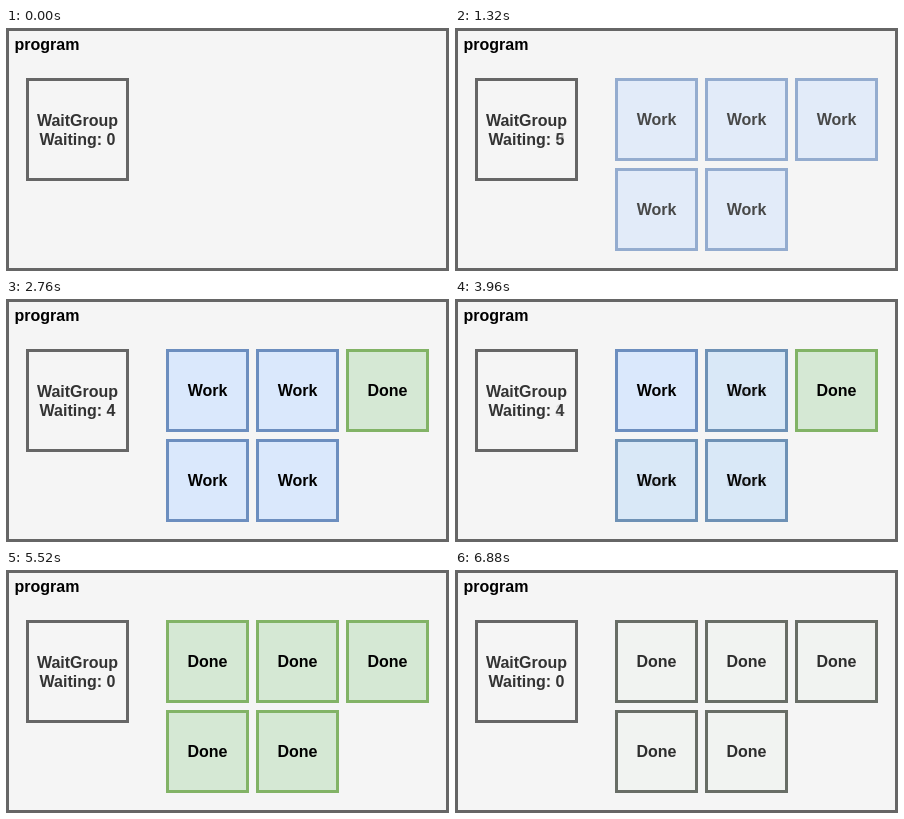
Animation of 443 by 243 pixels, one loop 9.1 s. Source, as an HTML page:

```html
<!DOCTYPE html>
<html lang="en">
<head>
<meta charset="utf-8">
<title>WaitGroup</title>
<style>
  html, body { margin: 0; width: 100%; height: 100%; overflow: hidden; }
  svg { display: block; width: 443px; height: 243px; }
  text { font: bold 16px "Liberation Sans", Arial, sans-serif; }
  rect { stroke-width: 3; }
</style>
</head>
<body>
<svg id="stage" viewBox="0 0 443 243"></svg>
<script>
const LOOP = 9100;
const STYLES = {
  plain: { fill: '#f5f5f5', stroke: '#666666', ink: '#333333' },
  work: { label: 'Work', fill: '#dae8fc', stroke: '#6c8ebf', ink: '#000000' },
  done: { label: 'Done', fill: '#d5e8d4', stroke: '#82b366', ink: '#000000' },
  gone: { label: 'Done', fill: '#f5f5f5', stroke: '#666666', ink: '#333333' }
};

// One letter per task: w = work, d = done, g = gone
const SCENES = [
  { waiting: 0, tasks: '' },
  { waiting: 5, tasks: 'wwwww' },
  { waiting: 4, tasks: 'wwdww' },
  { waiting: 1, tasks: 'wdddd' },
  { waiting: 0, tasks: 'ddddd' },
  { waiting: 0, tasks: 'ggggg' }
];
const KINDS = { w: STYLES.work, d: STYLES.done, g: STYLES.gone };

// Each fade leads from one scene to the next in discrete steps
const FADES = [
  ...[1200, 2580, 3960, 5340].map(start => ({ start, step: 20, from: 0.1, gain: 0.1, max: 1 })),
  { start: 6760, step: 40, from: 0.3, gain: 0.2, max: 0.9 }
];

const box = (x, y, w, h, { fill, stroke }) =>
  `<rect x="${x}" y="${y}" width="${w}" height="${h}" fill="${fill}" stroke="${stroke}"/>`;
const label = (x, y, str, ink, anchor = 'middle') =>
  `<text x="${x}" y="${y}" fill="${ink}" text-anchor="${anchor}">${str}</text>`;

function task(letter, i) {
  const kind = KINDS[letter];
  const x = 161.5 + (i % 3) * 90;
  const y = 51.5 + Math.floor(i / 3) * 90;
  return box(x, y, 80, 80, kind) + label(x + 40, y + 45.5, kind.label, kind.ink);
}

function scene({ waiting, tasks }) {
  const { plain } = STYLES;
  return '<g>' +
    box(1.5, 1.5, 440, 240, plain) +
    label(8.5, 22, 'program', '#000000', 'start') +
    box(21.5, 51.5, 100, 100, plain) +
    label(71.5, 98, 'WaitGroup', plain.ink) +
    label(71.5, 117, `Waiting: ${waiting}`, plain.ink) +
    [...tasks].map(task).join('') + '</g>';
}

const stage = document.getElementById('stage');
stage.innerHTML = SCENES.map(scene).join('');
const layers = [...stage.children];

function fadeLevel({ start, step, from, gain, max }, t) {
  if (t < start) return 0;
  return Math.min(max, from + gain * Math.floor((t - start) / step));
}

function render(now) {
  const t = now % LOOP;
  layers.forEach((layer, i) => {
    layer.setAttribute('opacity', i ? fadeLevel(FADES[i - 1], t) : 1);
  });
}

function tick() {
  render(performance.now());
  requestAnimationFrame(tick);
}
tick();
</script>
</body>
</html>
```
